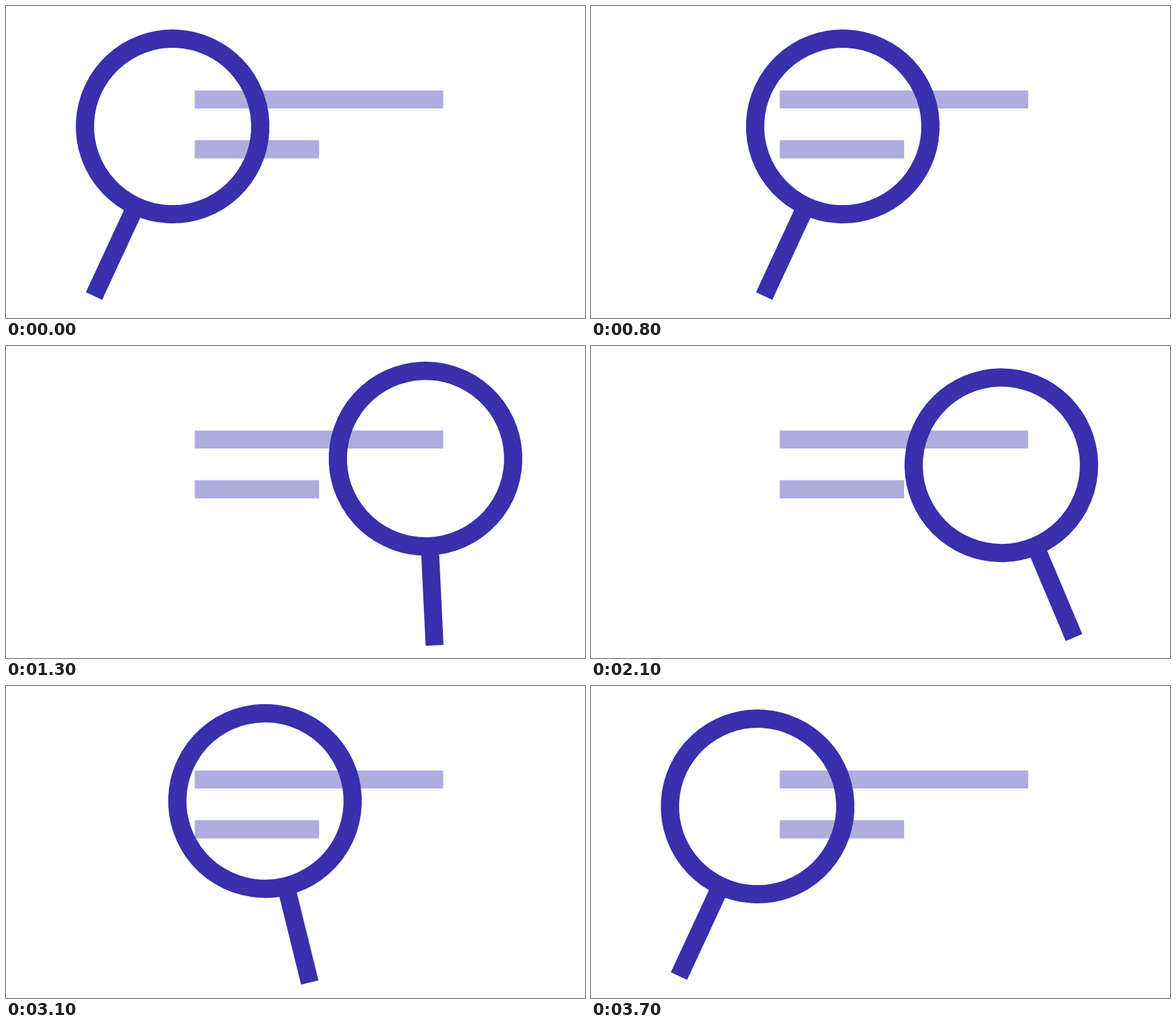
Write an HTML page with a canvas that moves like this. It is 888 by 478 pixels and loops after 4800 ms.

```html
<!DOCTYPE html>
<html lang="en">
<head>
<meta charset="utf-8">
<title>Magnifier</title>
<style>
  html, body { margin: 0; width: 100%; height: 100%; overflow: hidden; background: #fff; }
  canvas { display: block; }
</style>
</head>
<body>
<canvas id="stage" width="888" height="478"></canvas>
<script>
const ctx = document.getElementById('stage').getContext('2d');
const LOOP = 4800, STEP = 100;
const INK = '#3830ac', BAR = '#afacde';
const LEFT = 200.4, MIDDLE = 451.5, RIGHT = 685.5;
const PIVOT_Y = 303.4, ARM = 131;
const LEAN_LEFT = 24.9, LEAN_RIGHT = -22.9;

// Ease from 0 to 1 between two times, as cubic-bezier(x1, 0, x2, 1)
function ease(t, from, to, x1 = 1 / 3, x2 = 2 / 3) {
  const x = Math.min(1, Math.max(0, (t - from) / (to - from)));
  let lo = 0, hi = 1;
  for (let i = 0; i < 24; i++) {
    const s = (lo + hi) / 2, r = 1 - s;
    if (3 * s * r * (r * x1 + s * x2) + s ** 3 < x) lo = s;
    else hi = s;
  }
  return lo * lo * (3 - 2 * lo);
}

// One sweep to the right, then back in two moves
function pivotX(t) {
  return LEFT
    + (RIGHT - LEFT) * ease(t, 93, 1465, 0.695, 0.727)
    - (RIGHT - MIDDLE) * ease(t, 2030, 2820)
    - (MIDDLE - LEFT) * ease(t, 2900, 3690, 0.606, 0.266);
}

function leanAt(t) {
  const turn = ease(t, 1055, 1498) - ease(t, 2976, 3422);
  return LEAN_LEFT + (LEAN_RIGHT - LEAN_LEFT) * turn;
}

function drawGlass(x, lean) {
  ctx.save();
  ctx.translate(x, PIVOT_Y);
  ctx.rotate(lean * Math.PI / 180);
  ctx.translate(0, -ARM);
  ctx.strokeStyle = ctx.fillStyle = INK;
  ctx.lineWidth = 28;
  ctx.beginPath();
  ctx.arc(0, 0, 134.5, 0, Math.PI * 2);
  ctx.stroke();
  ctx.fillRect(-13.75, 134, 27.5, 152.4);
  ctx.restore();
}

function draw(t) {
  ctx.fillStyle = '#fff';
  ctx.fillRect(0, 0, 888, 478);
  ctx.fillStyle = BAR;
  ctx.fillRect(289.5, 129.5, 381, 27.5);
  ctx.fillRect(289.5, 205.5, 190.7, 28);
  drawGlass(pivotX(t), leanAt(t));
}

const start = performance.now();
function tick() {
  const t = (performance.now() - start) % LOOP;
  draw(Math.floor(t / STEP) * STEP);
  requestAnimationFrame(tick);
}
tick();
</script>
</body>
</html>
```
